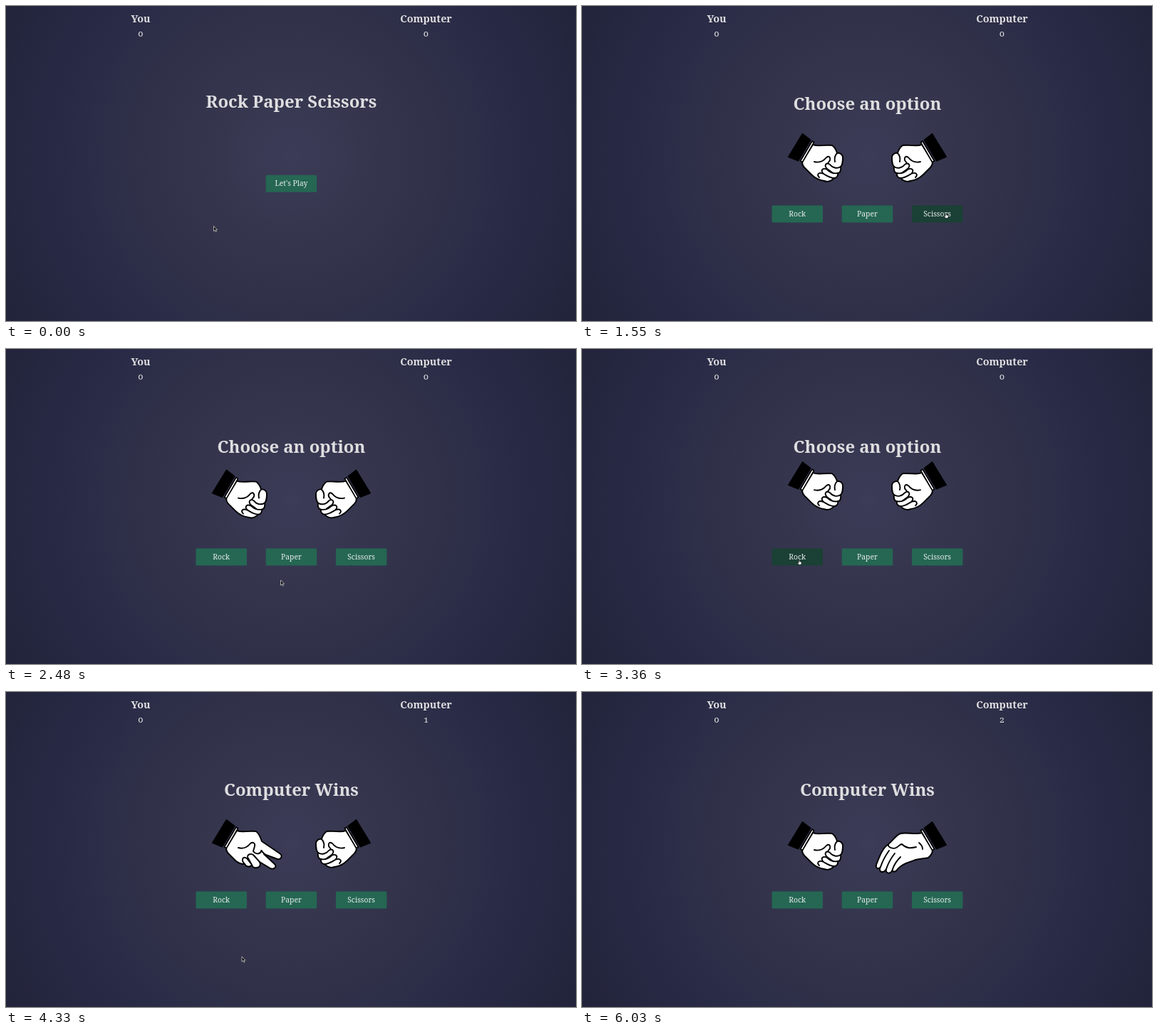
An HTML page that plays this animation: 800x443 px, repeating every 6.36 s.

```html
<!DOCTYPE html>
<html lang="en">
<head>
<meta charset="utf-8">
<title>Rock Paper Scissors</title>
<style>
html, body { margin: 0; width: 100%; height: 100%; overflow: hidden; }
body { background: radial-gradient(circle 475px at 400px 212px, #3c3b58, #36374f 20%, #313249 42%, #292a46 66%, #212339); }
svg { display: block; width: 800px; height: 443px; }
text { font-family: "Noto Serif", serif; fill: #dedee0; text-anchor: middle; }
.title { font-size: 23.9px; font-weight: 700; }
.name { font-size: 14.3px; font-weight: 700; }
.score { font-size: 12.6px; font-variant-numeric: oldstyle-nums; }
.button text { font-size: 10.3px; fill: #e8ecea; }
.button rect { fill: #256753; }
.button.hover rect { fill: #1b4035; }
.hand path { stroke: #000; stroke-width: 1.9; stroke-linejoin: round; stroke-linecap: round; }
.skin { fill: #fff; }
.lines { fill: none; }
</style>
</head>
<body>
<svg viewBox="0 0 800 443">
  <text class="name" x="189" y="23">You</text>
  <text class="name" x="589.5" y="23">Computer</text>
  <text class="score" id="myScore" y="43">0</text>
  <text class="score" id="cpuScore" y="43">0</text>
  <g id="intro">
    <text class="title" x="400.5" y="143">Rock Paper Scissors</text>
  </g>
  <g id="match">
    <text class="title" id="status" x="400.5" y="146"></text>
    <g id="mine" class="hand"></g>
    <g id="theirs" class="hand"></g>
  </g>
  <g id="cursor">
    <path id="arrow" d="M0 0V7.2L1.7 5.7 2.8 8.2 4 7.7 2.9 5.2H5Z" fill="#111" stroke="#ddd" stroke-width=".7"/>
    <path id="pointer" d="M-.7 1Q0 .4.7 1V3L3 3.6V5.4L2.3 7.300H-.9L-2.400 4.700-1.800 4.100-.7 4.800Z" fill="#fff" stroke="#111" stroke-width=".6"/>
  </g>
</svg>
<script>
const LOOP = 6360, START = 480, SHAKE = 1685, RESULT = 3685, SECOND = 4700;
const $ = id => document.getElementById(id);

// Each pose: silhouette, then inner lines (left hand)
const WRIST = 'L312 227Q309 224 309 219Z';
const POSES = {
  rock: [
    'M324 195C332 198 337 195 351 196C355 199 357 203 358 207C362 206 366 209 366 213C366 219 366 223 363 226C364 231 362 235 359 235C360 239 357 242 354 242C350 246 345 248 340 246C333 245 327 242 322 237' + WRIST,
    'M326 219C334 221 339 218 343 213C347 210 349 213 348 217L345 221M358 207C355 210 354 214 355 219M363 226C358 229 352 228 348 223C343 219 339 224 344 229L351 234M359 235C354 236 348 234 344 230C338 227 334 231 339 236L346 240M354 242C348 242 344 239 339 236C332 233 329 237 333 241'],
  scissors: [
    'M324 195C332 198 337 195 351 196C355 199 357 204 359 210L384 227C389 230 386 236 381 235L362 228 377 242C381 246 376 250 371 248L356 239C358 243 356 247 352 247C348 248 346 246 345 243C343 247 337 246 335 242C330 242 325 240 322 237' + WRIST,
    'M326 219C333 221 339 218 343 213C347 210 350 213 349 217L347 224C352 230 357 227 359 223M345 243L340 234C337 230 342 226 347 229L356 239M335 242C329 236 333 230 338 234L345 243M358 223L364 229'],
  paper: [
    'M324 195C332 198 346 194 354 196C360 198 366 207 371 211C380 217 384 230 388 240C389 245 385 247 382 243C386 250 378 253 374 246C376 253 367 254 365 246C366 251 361 251 358 246C352 239 342 236 333 233C325 231 318 231 315 230' + WRIST,
    'M371 211C372 216 364 218 360 216C356 214 355 211 352 211C346 217 340 217 332 215M328 209Q323 213 323 218M370 220Q378 231 382 243M362 224Q370 234 374 246M354 229Q362 237 365 246']
};
const CUFF = '<path d="M309.5 180L320.5 188.5 303.500 217.500 290 212Z"/>' +
  '<path class="skin" d="M323 190L325.500 191.800 309.500 219.500 306.500 218Z" style="stroke-width:1.700"/>';

function setHand(el, name) {
  if (el.pose === name) return;
  el.pose = name;
  const [skin, lines] = POSES[name];
  el.innerHTML = `<path class="skin" d="${skin}"/><path class="lines" d="${lines}"/>` + CUFF;
}

function addButton(parent, label, x, y) {
  const g = document.createElementNS('http://www.w3.org/2000/svg', 'g');
  g.innerHTML = `<rect x="${x}" y="${y}" width="71.5" height="24" rx="1.5"/>` +
    `<text x="${x + 35.7}" y="${y + 15.5}">${label}</text>`;
  $(parent).append(g);
  return { g, parent, x, y };
}
const buttons = [
  addButton('intro', "Let's Play", 364.7, 237.7),
  addButton('match', 'Rock', 266.5, 280.6),
  addButton('match', 'Paper', 364.7, 280.6),
  addButton('match', 'Scissors', 462.9, 280.6)
];

// Cursor stops: time, x, y
const PATH = [
  [0, 291.5, 309.5], [30, 291.5, 309.5], [330, 391, 247], [1100, 391, 247],
  [1330, 470, 302], [1500, 511, 291], [1800, 511, 291], [2200, 385.5, 325],
  [2480, 385.5, 325], [2900, 330, 314], [3060, 330, 314], [3350, 305, 296],
  [3680, 305, 296], [3850, 331, 360], [4150, 331, 372], [4350, 331, 372],
  [4650, 301, 294], [5150, 301, 294], [5640, 330, 235], [6030, 350, -14], [LOOP, 350, -14]
];
const BOUNCE = [[0, 0], [.15, -21], [.25, 0], [.35, -21], [.5, 0], [.65, -21], [.75, 0], [.85, -21], [1, 0]];

const clamp = v => Math.min(1, Math.max(0, v));
const smooth = v => v * v * (3 - 2 * v);

// CSS "ease" timing curve
function ease(p) {
  let lo = 0, hi = 1, s;
  for (let i = 0; i < 20; i++) {
    s = (lo + hi) / 2;
    if (.75 * s * (1 - s) + s ** 3 < p) lo = s; else hi = s;
  }
  return .3 * s * (1 - s) ** 2 + 3 * s * s * (1 - s) + s ** 3;
}

function sample(keys, t, curve) {
  const i = Math.max(1, keys.findIndex(k => k[0] >= t));
  const a = keys[i - 1], b = keys[i];
  const p = curve(clamp((t - a[0]) / (b[0] - a[0])));
  return a.slice(1).map((v, n) => v + (b[n + 1] - v) * p);
}

function draw(t) {
  const second = t >= SECOND, done = t >= RESULT;

  $('intro').style.opacity = 1 - smooth(clamp((t - START) / 280));
  $('match').style.opacity = smooth(clamp((t - 800) / 290));
  $('status').textContent = done ? 'Computer Wins' : 'Choose an option';

  setHand($('mine'), done && !second ? 'scissors' : 'rock');
  setHand($('theirs'), second ? 'paper' : 'rock');
  const lift = second ? 3 : sample(BOUNCE, clamp((t - SHAKE) / 2000), ease)[0];
  $('mine').setAttribute('transform', `translate(0 ${lift})`);
  $('theirs').setAttribute('transform', `translate(801 ${lift}) scale(-1 1)`);

  const sway = Math.sin(Math.PI * clamp((t - SECOND) / 900));
  const phase = (t - 5000) / 400 * 2 * Math.PI;
  $('myScore').setAttribute('x', 189 + 9.2 * sway * Math.cos(phase + .9));
  $('cpuScore').setAttribute('x', 589.5 + 15 * sway * Math.cos(phase));
  $('cpuScore').textContent = second ? 2 : done ? 1 : 0;

  const [x, y] = sample(PATH, t, smooth);
  const active = t < START ? 'intro' : t > 800 ? 'match' : '';
  let over = false;
  for (const b of buttons) {
    const hit = b.parent === active && x > b.x && x < b.x + 71.5 && y > b.y && y < b.y + 24;
    b.g.setAttribute('class', hit ? 'button hover' : 'button');
    over = over || hit;
  }
  $('cursor').setAttribute('transform', `translate(${x} ${y})`);
  $('arrow').style.display = over ? 'none' : '';
  $('pointer').style.display = over ? '' : 'none';
}

const origin = performance.now();
function tick() {
  draw((performance.now() - origin) % LOOP);
  requestAnimationFrame(tick);
}
tick();
</script>
</body>
</html>
```
